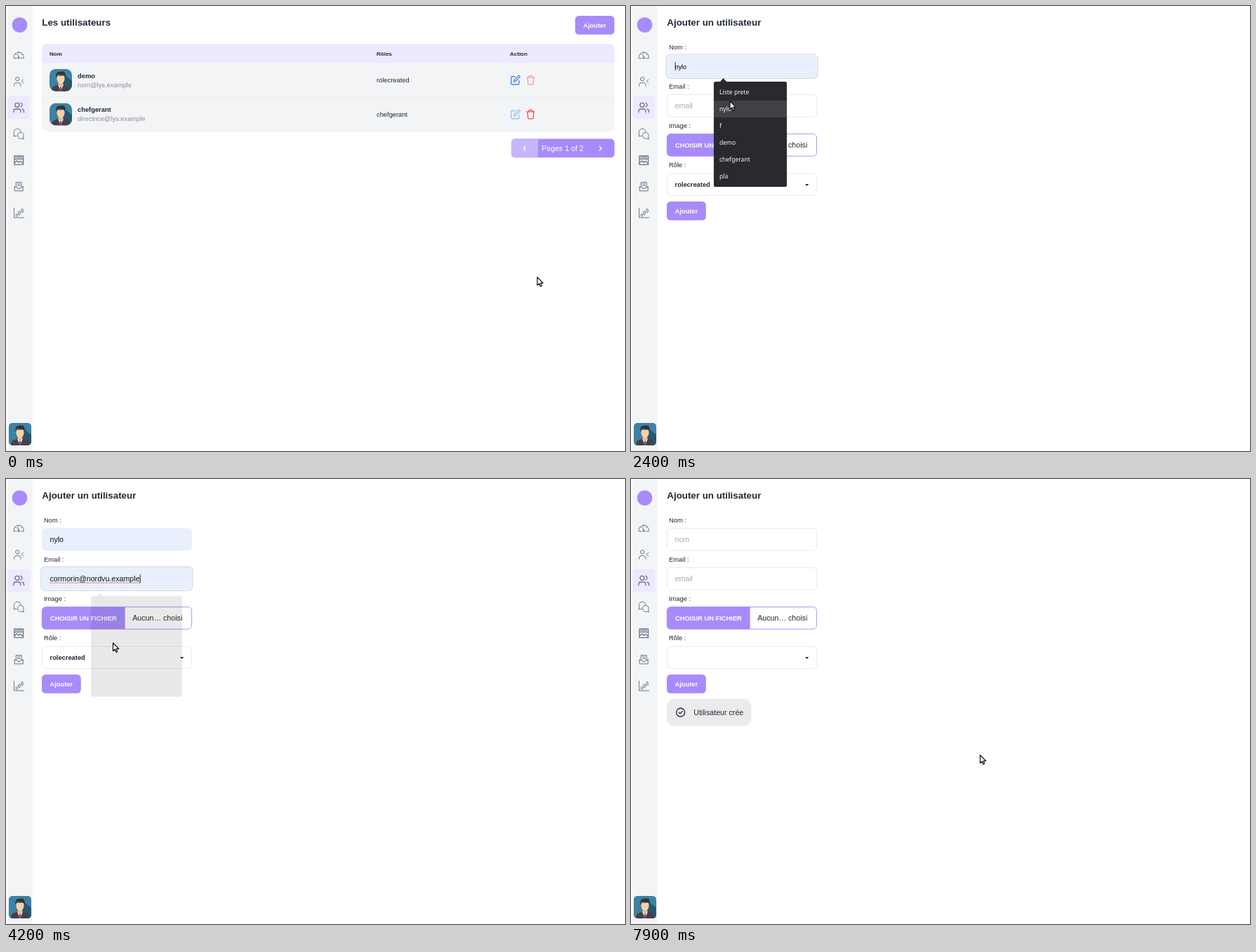
Write an HTML page with a canvas that moves like this. It is 882 px wide and 635 px high and loops after 8000 ms.

```html
<!DOCTYPE html>
<html lang="fr">
<head>
<meta charset="utf-8">
<title>Utilisateurs</title>
<style>
html, body { margin: 0; width: 882px; height: 635px; overflow: hidden; background: #fff; }
canvas { display: block; }
</style>
</head>
<body>
<canvas id="stage" width="882" height="635"></canvas>
<script>
const ctx = document.getElementById('stage').getContext('2d');
const LOOP = 8000;
const STEP = 100;
const SANS = '"Liberation Sans", Arial, sans-serif';
const NATIVE = '"Noto Sans", "Open Sans", sans-serif';
const SMALL = 9.33, BODY = 10.67;
const VIOLET = '#a78bfa', VIOLET_DARK = '#8b5cf6', PALE = '#ede9fe';
const GRAY = '#f3f4f6', INK = '#1f2937', FILLED = '#e8f0fe';

const NAMES = ['Liste prete', 'nylo', 'f', 'demo', 'chefgerant', 'pla'];
const EMAILS = ['nnyloparavel@lys.example', 'directrice@lys.example', 'cormorin@nordvu.example',
  'nylop1234@lys.example', 'wxcv', 'bouleau6@prem.example'];
const ROLES = ['rolecreated', 'chefgerant', ''];

const FIELD = { x: 51.3, w: 213.3, h: 31.6 };
const NAME_Y = 70.4, EMAIL_Y = 126.5, FILE_Y = 182.6, ROLE_Y = 238.9;
const SUBMIT = { x: 51, y: 279, w: 55.8, h: 26.8 };
const NEW = { x: 811, y: 14, w: 55.8, h: 26.8 };

const ICONS = {
  gauge: 'M7 19H1.5V16A10.5 10 0 0 1 22.5 16V19H17M12 17L9.5 10.5M12 6v2M5 10l1.8 1.2M19 10l-1.8 1.2M10 18a2 2 0 1 0 4 0a2 2 0 1 0-4 0',
  back: 'M5 7a4 4 0 1 0 8 0a4 4 0 1 0-8 0M2 22v-2a5 5 0 0 1 5-5h4a5 5 0 0 1 5 5v2M22 8l-4 4 4 4',
  users: 'M4 6.5a4.5 4.5 0 1 0 9 0a4.5 4.5 0 1 0-9 0M1 22v-2a5 5 0 0 1 5-5h5a5 5 0 0 1 5 5v2M16 2.2a4.5 4.5 0 0 1 0 8.6M23 22v-2a5 5 0 0 0-4-4.9',
  chat: 'M7 16.5L1 17l1.4-4.5A7.7 7.7 0 1 1 16.5 6.5M14.5 8.5a7 7 0 0 1 7 10.6L23 23l-4.5-1A7 7 0 1 1 14.5 8.5',
  media: 'M2.5 3h19v18.5h-19zM2.5 9.5h19M2.5 18l5.5-5 4 4 3.5-3 6 5M5.5 6.2h2M10 6.2h8',
  inbox: 'M3 12v9.5h18V12M3 13.5h5l1.5 3h5l1.5-3h5M6 13V3h12v10M9 6.5h6M9 10h6',
  chart: 'M2 2v20.5h21M6 18a1.8 1.8 0 1 0 3.6 0v-2a1.8 1.8 0 1 0-3.6 0zM11.5 14.5a1.8 1.8 0 1 0 3.6 0v-4a1.8 1.8 0 1 0-3.6 0zM17.5 9.5a1.8 1.8 0 1 0 3.6 0v-4a1.8 1.8 0 1 0-3.6 0z',
  edit: 'M11 4H4a2 2 0 0 0-2 2v14a2 2 0 0 0 2 2h14a2 2 0 0 0 2-2v-7M18.5 2.5a2.1 2.1 0 0 1 3 3L12 15l-4 1 1-4z',
  trash: 'M3 6h18M19 6l-1 14a2 2 0 0 1-2 2H8a2 2 0 0 1-2-2L5 6M8 6V4a2 2 0 0 1 2-2h4a2 2 0 0 1 2 2v2'
};
const ARROW = new Path2D('M0 0V11.4L2.7 9L4.4 13.1L6.3 12.3L4.6 8.3H8.3Z');
const HAND = new Path2D('M1.4 0.6Q2.6 0 3 1.2V4.2L7 5Q8.6 5.4 8.4 7L7.6 11H2.6L-.6 7Q-.4 5.6 1 6.6L.8 1.4Z');

// Each move: start, end, x, y. The pointer rests between moves.
const START = [757, 387];
const MOVES = [
  [0, 500, 836, 28], [900, 1200, 564, 146], [1200, 1700, 126, 84], [2100, 2400, 141, 136],
  [3200, 3500, 160, 239.5], [3500, 3700, 150, 230], [4100, 4200, 152.5, 234], [4200, 4300, 142, 243],
  [4400, 4500, 117, 244], [4600, 4800, 119, 265], [5000, 5100, 119, 259], [5200, 5400, 116, 288],
  [5500, 5600, 112, 281], [5900, 6000, 105, 294], [6200, 6300, 89, 296], [6700, 6800, 490, 399],
  [7000, 7100, 516, 403], [7800, 7900, 497.5, 394]
];

function pointerAt(t) {
  let [x, y] = START;
  for (const [from, to, px, py] of MOVES) {
    const k = Math.min(1, Math.max(0, (t - from) / (to - from)));
    x += (px - x) * k;
    y += (py - y) * k;
  }
  return { x, y };
}

const during = (t, a, b) => t >= a && t < b;
const inside = (p, r) => p.x >= r.x && p.x < r.x + r.w && p.y >= r.y && p.y < r.y + r.h;

function box(x, y, w, h, r, fill, stroke, width = 0.8) {
  ctx.beginPath();
  ctx.roundRect(x, y, w, h, r);
  if (fill) { ctx.fillStyle = fill; ctx.fill(); }
  if (stroke) { ctx.strokeStyle = stroke; ctx.lineWidth = width; ctx.stroke(); }
}

// Text is placed by its left edge and the middle of its capitals.
function text(str, x, cy, size, color, weight = '', family = SANS) {
  ctx.font = `${weight} ${size}px ${family}`;
  ctx.fillStyle = color;
  ctx.fillText(str, x, cy + size * 0.355);
  return ctx.measureText(str).width;
}

function line(d, x, y, scale, color, width) {
  ctx.save();
  ctx.translate(x, y);
  ctx.scale(scale, scale);
  ctx.strokeStyle = color;
  ctx.lineWidth = width / scale;
  ctx.lineCap = ctx.lineJoin = 'round';
  ctx.stroke(new Path2D(d));
  ctx.restore();
}

function icon(name, cx, cy, size, color, width = 1.1) {
  line(ICONS[name], cx - size / 2, cy - size / 2, size / 24, color, width);
}

function shape(d, color) {
  ctx.fillStyle = color;
  ctx.fill(new Path2D(d));
}

function avatar(x, y, radius) {
  ctx.save();
  ctx.translate(x, y);
  ctx.beginPath();
  ctx.roundRect(0, 0, 32, 32, radius);
  ctx.clip();
  shape('M0 0H32V32H0Z', '#3c82a4');
  shape('M21 8L32 17V32H18Z', '#28566d');
  shape('M3 32Q3 25 8 24L13 22H19L24 24Q29 25 29 32Z', '#47413f');
  shape('M12 22L16 32L20 22Z', '#fff');
  shape('M13 18H19V23L16 26L13 23Z', '#e8b48c');
  shape('M15 25.5H17L18 32H14Z', '#7d4a91');
  shape('M10.5 10H21.5V15Q20 21 16 22Q12 21 10.5 15Z', '#fbd0a5');
  shape('M9.8 13Q8 4 14 4Q23 2 22.5 9L22 13L20.5 9Q15 9 12 8Z', '#3b302f');
  ctx.restore();
}

function button(r, color, label = '#fff', scale = 1) {
  ctx.save();
  ctx.translate(r.x + r.w / 2, r.y + r.h / 2);
  ctx.scale(scale, scale);
  box(-r.w / 2, -r.h / 2, r.w, r.h, 5.3, color);
  text('Ajouter', -16.4, -0.2, SMALL, label, 'bold');
  ctx.restore();
}

function sidebar() {
  box(2, 0.5, 36, 636, 4, GRAY);
  box(2, 129, 32, 32, 2, PALE);
  ctx.fillStyle = VIOLET;
  ctx.beginPath();
  ctx.arc(19.5, 27, 10.8, 0, Math.PI * 2);
  ctx.fill();
  ['gauge', 'back', 'users', 'chat', 'media', 'inbox', 'chart'].forEach((name, i) =>
    icon(name, 18.2, 70 + i * 37.5, 16, '#64748b', i === 2 || i === 4 ? 1.3 : 1));
  avatar(4, 595, 5);
}

function userRow(cy, name, email, role, editColor, trashColor) {
  avatar(62, cy - 16, 9);
  text(name, 102, cy - 6.5, SMALL, INK, 'bold');
  text(email, 102, cy + 6.6, SMALL, '#8b9097');
  text(role, 528, cy - 0.3, SMALL, INK);
  icon('edit', 726, cy, 15, editColor, 1.35);
  icon('trash', 747.5, cy, 15, trashColor, 1.25);
}

function listPage(p) {
  text('Les utilisateurs', 51.3, 23, 13.33, INK, 'bold');
  button(NEW, inside(p, NEW) ? VIOLET_DARK : VIOLET);
  box(51, 54, 816, 125, 8, GRAY);
  box(51, 54, 816, 27, [8, 8, 0, 0], PALE);
  ctx.fillStyle = '#e8eaed';
  ctx.fillRect(51, 129.6, 816, 0.8);
  [['Nom', 62], ['Rôles', 528], ['Action', 718]].forEach(([s, x]) => text(s, x, 68, 8, INK, 'bold'));
  userRow(105.7, 'demo', 'nom@lys.example', 'rolecreated', '#3b8af2', '#f49b99');
  userRow(154.5, 'chefgerant', 'directrice@lys.example', 'chefgerant', '#91c3f7', '#ee4a4a');
  box(720, 189.4, 147, 26.8, 5.3, VIOLET);
  box(720, 189.4, 38, 26.8, [5.3, 0, 0, 5.3], '#c4b5fd');
  text('Pages 1 of 2', 763.2, 203, BODY, '#fff');
  line('M740.2 200.4L737.6 203.2L740.2 206M845.8 200.4L848.4 203.2L845.8 206', 0, 0, 1, '#fff', 1.4);
}

function field(y, focused, fill = '#fff') {
  box(FIELD.x, y, FIELD.w, FIELD.h, 5.3, fill, fill === '#fff' ? '#e2e4e7' : fill);
  if (focused) box(FIELD.x - 1.4, y - 1.4, FIELD.w + 2.8, FIELD.h + 2.8, 6.5, null, '#d4d7dc', 1.2);
}

function misspelt(x, y, width) {
  ctx.fillStyle = '#e0313f';
  for (let dx = 0; dx < width; dx += 2.7) ctx.fillRect(x + dx, y, 1.5, 1);
}

function input(y, { hint, value, preview, focused, caret }) {
  const cy = y + 15.8;
  field(y, focused, value || preview ? FILLED : '#fff');
  let width = 0;
  if (value) {
    width = text(value, 62.5, cy - 0.2, BODY, '#111');
    if (focused) misspelt(62.5, cy + 5.3, width);
  } else if (preview) {
    text(preview, 62.7, cy + 0.2, 8.89, '#000');
  } else {
    text(hint, 62.5, cy, BODY, '#a3a9b3');
  }
  if (focused && caret) {
    ctx.fillStyle = '#111';
    ctx.fillRect(62.7 + width, cy - 6, 0.9, 12);
  }
}

function suggestions(top, width, items, hover, alpha = 1, scale = 1) {
  const cx = 118 + width / 2, cy = top + 75;
  ctx.save();
  ctx.globalAlpha = alpha;
  ctx.translate(cx, cy);
  ctx.scale(scale, scale);
  ctx.translate(-cx, -cy);
  ctx.shadowColor = 'rgba(0,0,0,.25)';
  ctx.shadowBlur = 2;
  box(118, top, width, 150, 2.5, '#2a2a2e');
  ctx.shadowBlur = 0;
  shape(`M126.5 ${top + .5}L131.5 ${top - 5}L136.5 ${top + .5}Z`, '#2a2a2e');
  items.forEach((item, i) => {
    const y = top + 3 + i * 24;
    if (i === hover) {
      ctx.fillStyle = '#424245';
      ctx.fillRect(118, y, width, 24);
    }
    text(item, 126, y + 11.8, 8.55, '#f4f4f6', '', NATIVE);
  });
  ctx.restore();
}

const hoveredRow = (p, top) => Math.floor((p.y - top - 3) / 24);

function roleMenu(p) {
  ctx.save();
  ctx.shadowColor = 'rgba(0,0,0,.25)';
  ctx.shadowBlur = 7;
  box(52, 270, 212, 41, 1, '#fff');
  ctx.restore();
  const hover = Math.floor((p.y - 270) / 14);
  ROLES.forEach((role, i) => {
    if (i === hover) box(52, 270 + i * 14, 212, 14, 0, '#e5e7eb');
    text(role, 62.5, 277 + i * 14, SMALL, INK, 'bold');
  });
}

function toast() {
  box(51, 313.8, 120.5, 38.6, 10.7, '#ebebec');
  ctx.strokeStyle = INK;
  ctx.lineWidth = 1.3;
  ctx.beginPath();
  ctx.arc(70.6, 333, 6, 0, Math.PI * 2);
  ctx.stroke();
  line('M68.2 333.2L69.9 334.9L73.1 331.5', 0, 0, 1, INK, 1.3);
  text('Utilisateur crée', 89.2, 333, BODY, INK);
}

function formPage(t, p) {
  const done = t >= 7300;
  const nameOpen = during(t, 1900, 2800), emailOpen = during(t, 3100, 4200);
  const nameRow = nameOpen ? hoveredRow(p, 108) : -1;
  const emailRow = emailOpen ? hoveredRow(p, 164) : -1;

  text('Ajouter un utilisateur', 51.3, 23, 13.33, INK, 'bold');
  ['Nom :', 'Email :', 'Image :', 'Rôle :'].forEach((s, i) => text(s, 54, 58.3 + i * 56.1, SMALL, INK));

  input(NAME_Y, {
    hint: 'nom', value: during(t, 2800, 7300) && NAMES[1], preview: NAMES[nameRow],
    focused: during(t, 1900, 3000), caret: true
  });
  input(EMAIL_Y, {
    hint: 'email', value: during(t, 4200, 7300) && EMAILS[2], preview: EMAILS[emailRow],
    focused: during(t, 3000, 5000), caret: t < 4700
  });

  box(FIELD.x, FILE_Y, FIELD.w, FIELD.h, 5.3, '#fff', VIOLET, 0.9);
  box(FIELD.x, FILE_Y, 118.3, FIELD.h, [5.3, 0, 0, 5.3], VIOLET);
  text('CHOISIR UN FICHIER', 63, 198.4, SMALL, '#fff', 'bold');
  text('Aucun… choisi', 180.2, 198.2, BODY, INK);

  field(ROLE_Y, during(t, 5000, 6500));
  if (!done) text('rolecreated', 62.5, 254.4, SMALL, INK, 'bold');
  shape('M248 254H253.4L250.7 256.8Z', INK);

  const popping = t < 1300 || during(t, 7300, 7600);
  const color = inside(p, SUBMIT) ? VIOLET_DARK : VIOLET;
  button(SUBMIT, color, popping ? '#eee8ff' : '#fff', popping || during(t, 6500, 6600) ? 0.985 : 1);
  if (done) toast();

  if (nameOpen) suggestions(108, 104, NAMES, nameRow);
  if (emailOpen) suggestions(164, 136, EMAILS, emailRow, t < 3200 ? 0.5 : 1, t < 3200 ? 0.98 : 1);
  if (during(t, 4200, 4300)) suggestions(164, 136, EMAILS, -1, 0.08, 0.956);
  if (during(t, 5100, 5900)) roleMenu(p);
}

function pointer(t, p) {
  const overField = y => inside(p, { ...FIELD, y });
  const onForm = t >= 1100;
  const typing = onForm && (overField(NAME_Y) || (overField(EMAIL_Y) && !during(t, 1900, 2800)));
  const pressing = onForm ? inside(p, SUBMIT) && !during(t, 5100, 5900) : inside(p, NEW);
  if (typing) {
    line('M-2 -6H2M0 -6V6M-2 6H2', p.x, p.y, 1, '#222', 1);
    return;
  }
  ctx.save();
  ctx.translate(p.x, p.y);
  ctx.lineJoin = 'round';
  ctx.lineWidth = 1.2;
  ctx.fillStyle = pressing ? '#111' : '#fff';
  ctx.strokeStyle = pressing ? '#fff' : '#111';
  const form = pressing ? HAND : ARROW;
  ctx.fill(form);
  ctx.stroke(form);
  ctx.restore();
}

function statusBar() {
  box(0, 622, 292, 13, [0, 2.5, 0, 0], '#1c1b20');
  text('En attente de localhost...', 2.7, 629.3, 7.9, '#f2f2f4', '', NATIVE);
}

function draw(t) {
  const p = pointerAt(t);
  ctx.fillStyle = '#fff';
  ctx.fillRect(0, 0, 882, 635);
  sidebar();
  if (t < 1100) listPage(p); else formPage(t, p);
  if (during(t, 900, 1500)) statusBar();
  pointer(t, p);
}

const began = performance.now();
function tick() {
  const t = (performance.now() - began) % LOOP;
  draw(Math.floor(t / STEP) * STEP);
  requestAnimationFrame(tick);
}
tick();
</script>
</body>
</html>
```
